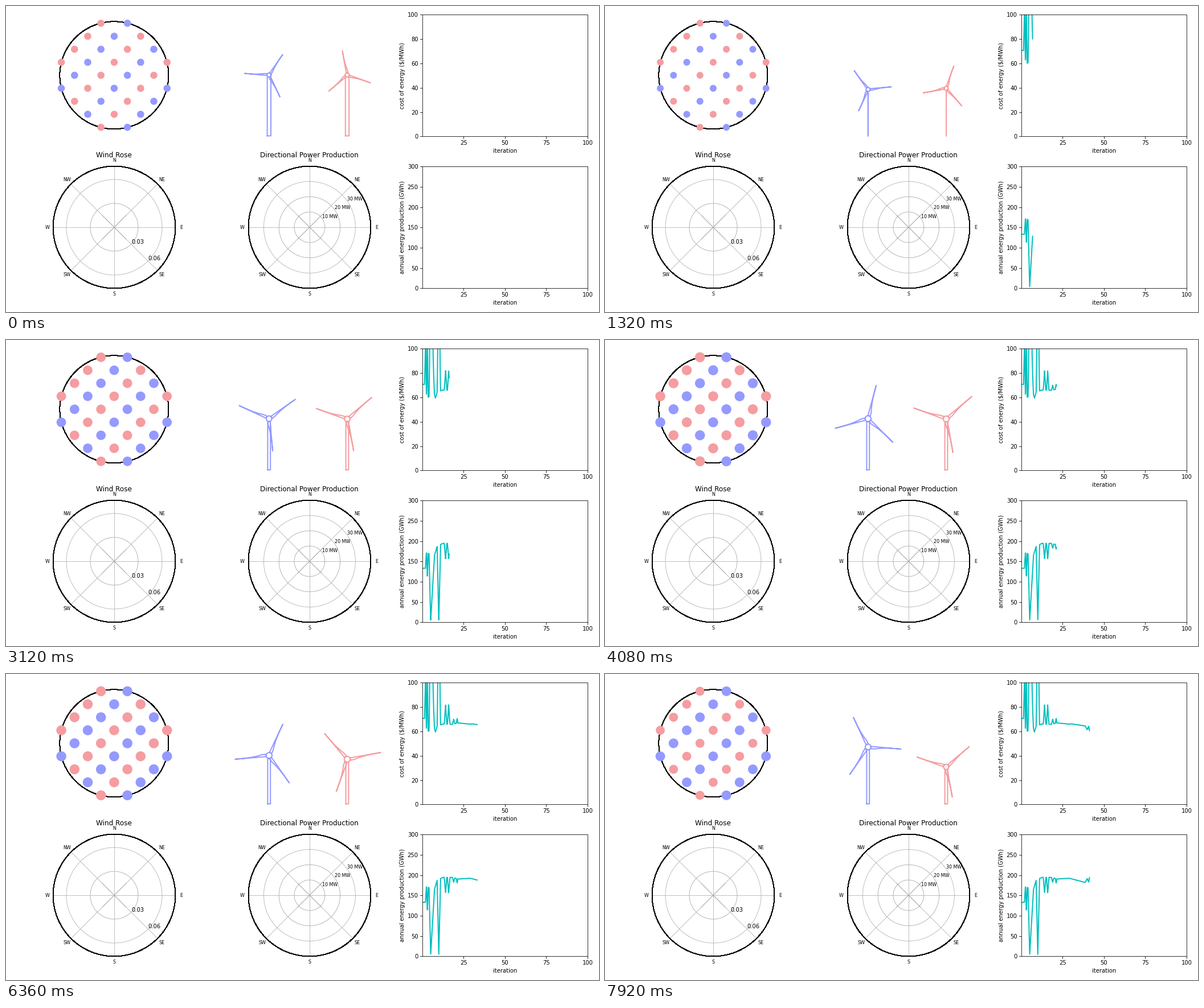
A matplotlib script for the animation above (8 s loop, 1041x538 px).

```python
import numpy as np
import matplotlib.pyplot as plt
from matplotlib.animation import FuncAnimation
from matplotlib.patches import Circle, Ellipse, Rectangle

W, H, DPI = 1041, 538, 72
TICK_MS, TICKS = 40, 200          # three ticks per visible step
ITER_PER_STEP = 0.625
BLUE, RED, CYAN = "#949aff", "#f59da1", "#00bfbf"
GRID, GRID_INNER = "#b0b0b0", "#a0a9a0"
BASE_Y = 228.3

fig = plt.figure(figsize=(W / DPI, H / DPI), dpi=DPI, facecolor="white")
ax = fig.add_axes([0, 0, 1, 1])
ax.set_xlim(0, W)
ax.set_ylim(H, 0)
ax.axis("off")


def label(x, y, text, size=10):
    """Text whose capitals are centred on y."""
    ax.text(x, y + 0.365 * size, text, fontsize=size, ha="center", va="baseline", zorder=5)


def stroke(xs, ys, color="black", lw=0.8, zorder=1):
    return ax.plot(xs, ys, color=color, lw=lw, zorder=zorder)[0]


# --- wind farm layout -------------------------------------------------
def build_layout(cx=189.9, cy=121.8, dx=23.2, dy=22.87):
    ax.add_patch(Ellipse((cx, cy), 191, 189, fill=False, ec="black", lw=1, aa=False))
    dots = {BLUE: [], RED: []}
    for row in range(-4, 5):
        for col in range(-4, 5):
            if (row + col) % 2 == 0 or row**2 + col**2 > 17:
                continue
            color = RED if (row + col) % 4 == 3 else BLUE
            dot = Circle((cx + col * dx, cy + row * dy), 6, fc=color, ec="none", zorder=3)
            dots[color].append(ax.add_patch(dot))
    return dots


# --- polar panels -----------------------------------------------------
def build_polar(cx, title, rings, cy=389, radius=107.4):
    for r in rings:
        color = GRID_INNER if r < 60 else GRID
        ax.add_patch(Circle((cx, cy), r, fill=False, ec=color, lw=0.8))
    for i, name in enumerate("E NE N NW W SW S SE".split()):
        c, s = np.cos(i * np.pi / 4), np.sin(i * np.pi / 4)
        stroke([cx, cx + radius * c], [cy, cy - radius * s], GRID)
        if i % 2:
            stroke([cx, cx + 30 * c], [cy, cy - 30 * s], GRID_INNER)
        label(cx + 117.8 * c, cy - 0.3 - 117.8 * s, name, 8)
    ax.add_patch(Circle((cx, cy), radius, fill=False, ec="black", lw=1, aa=False, zorder=3))
    label(cx - 0.3, 262, title, 12)


# --- line charts ------------------------------------------------------
class Chart:
    left, right = 730.7, 1021

    def __init__(self, top, bottom, ymax, ystep, ylabel):
        self.top, self.bottom, self.ymax = top, bottom, ymax
        frame = Rectangle((self.left, top), self.right - self.left, bottom - top,
                          fill=False, ec="black", lw=0.8, zorder=4)
        ax.add_patch(frame)
        for v in range(25, 101, 25):
            x = self.x(v)
            stroke([x, x], [bottom, bottom + 3.5], zorder=4)
            ax.text(x, bottom + 7, str(v), ha="center", va="top")
        for v in range(0, ymax + 1, ystep):
            y = self.y(v)
            stroke([self.left - 3.5, self.left], [y, y], zorder=4)
            ax.text(self.left - 7, y, str(v), ha="right", va="center_baseline")
        ax.text(self.x(50), bottom + 21, "iteration", ha="center", va="top")
        ax.text(700.7, self.y(ymax / 2), ylabel, rotation=90,
                rotation_mode="anchor", ha="center", va="bottom")
        self.line = stroke([], [], CYAN, 2, 2)
        self.line.set_clip_path(frame)

    def x(self, v):
        return self.left + (self.right - self.left) * v / 100

    def y(self, v):
        return self.bottom - (self.bottom - self.top) * v / self.ymax

    def show(self, t, values):
        self.line.set_data(self.x(t), self.y(values))


# --- optimiser history ------------------------------------------------
# Failed line searches: iteration, energy lost, iterations to fall and recover
OVERSHOOTS = [(3.1, 57, 0.5, 0.5), (5.1, 164, 1, 2.3), (10, 186, 1, 1.1),
              (14.1, 38, 0.8, 0.8), (16, 38, 0.8, 0.8), (19, 11, 0.7, 0.7),
              (21.1, 11, 0.5, 0.5), (40.8, 11, 0.9, 0.5)]


def energy(t):
    level = np.interp(t, [1.9, 2.5, 7.4, 9, 12.5, 18, 22, 29, 38.7, 39.9, 41.3],
                      [133, 171, 165, 187, 194.5, 194.5, 190.5, 192.3, 182, 191.5, 195])
    for centre, loss, fall, recover in OVERSHOOTS:
        width = np.where(t < centre, fall, recover)
        level = level - loss * np.clip(1 - np.abs(t - centre) / width, 0, 1)
    return level


def cost(t):
    """Cost of energy is total spending over energy produced."""
    spend = np.interp(t, [1.4, 2.1, 2.5, 3.1, 3.5, 8, 9, 12.5, 30, 38.5],
                      [9400, 15000, 10700, 13000, 10200, 10300, 12000, 12850, 12660, 11750])
    return spend / energy(t)


# --- turbines ---------------------------------------------------------
DESIGN_T = [1, 6.9, 11.9, 29, 33.1, 41.25]
HEIGHTS = {BLUE: [107, 81.5, 90, 90, 85, 100], RED: [107, 83.5, 89.5, 89.5, 78.5, 65]}
LATE_SHRINK = {BLUE: 2, RED: 6}


def rotor_radius(t, color):
    """Rotors grow with the energy they deliver, up to a size limit."""
    shrink = LATE_SHRINK[color] * np.clip((t - 33) / 8.25, 0, 1)
    return np.clip(43 + 0.4 * (energy(t) - 133), 36, 60) - shrink


def blade_outline():
    x = np.linspace(0.2, 1, 12)
    edge = (0.8 - 2.3 * ((1 - x) / 0.8) ** 3) / 35
    root, flat = 3 / 35, 0.9 / 35
    return (np.concatenate([[root], x, [root, root]]),
            np.concatenate([[edge[0]], edge, [flat, edge[0]]]))


BLADE_X, BLADE_Y = blade_outline()


def turbine_path(cx, radius, height, half, angle):
    hub_y = BASE_Y - height
    hub = radius * 3 / 35
    top = hub_y + hub
    xs = [cx + half * np.array([-1, -1, 1, 1, -1, np.nan])]
    ys = [[BASE_Y, top, top, BASE_Y, BASE_Y, np.nan]]
    for turn in (0, 120, 240):
        a = np.radians(angle + turn)
        bx = BLADE_X * np.cos(a) - BLADE_Y * np.sin(a)
        by = BLADE_X * np.sin(a) + BLADE_Y * np.cos(a)
        xs.append(np.append(cx + radius * bx, np.nan))
        ys.append(np.append(hub_y - radius * by, np.nan))
    ring = np.linspace(0, 2 * np.pi, 33)
    xs.append(cx + hub * np.cos(ring))
    ys.append(hub_y + hub * np.sin(ring))
    return np.concatenate(xs), np.concatenate(ys)


dots = build_layout()
build_polar(190, "Wind Rose", (42, 84))
label(231, 414, "0.03")
label(260.5, 443, "0.06")
build_polar(532.9, "Directional Power Production", (26.9, 53.7, 80.5))
for i in range(3):
    label(568.5 + 22 * i, 370 - 15.5 * i, f"{10 * (i + 1)} MW", 8)

cost_chart = Chart(15.2, 229.4, 100, 20, "cost of energy ($/MWh)")
energy_chart = Chart(282.2, 496.4, 300, 50, "annual energy production (GWh)")

# colour: line, centre x, first angle, degrees per step
turbines = {BLUE: (stroke([], [], BLUE, 2, 3), 461.8, 55, 50),
            RED: (stroke([], [], RED, 2, 3), 599, 100, 30)}


def update(tick):
    step = tick // 3
    t = step * ITER_PER_STEP
    half = np.interp(t, [1, 6.9, 11.9], [3.2, 0, 2.4])
    for color, (line, cx, start, spin) in turbines.items():
        radius = rotor_radius(t, color)
        height = np.interp(t, DESIGN_T, HEIGHTS[color])
        for dot in dots[color]:
            dot.set_radius(0.146 * radius)
        line.set_data(*turbine_path(cx, radius, height, half, start + spin * step))
    past = np.linspace(0, t, 16 * step)
    cost_chart.show(past, cost(past))
    energy_chart.show(past, energy(past))
    return []


anim = FuncAnimation(fig, update, frames=TICKS, interval=TICK_MS,
                     repeat=True, repeat_delay=0, cache_frame_data=False)
plt.show()
```
